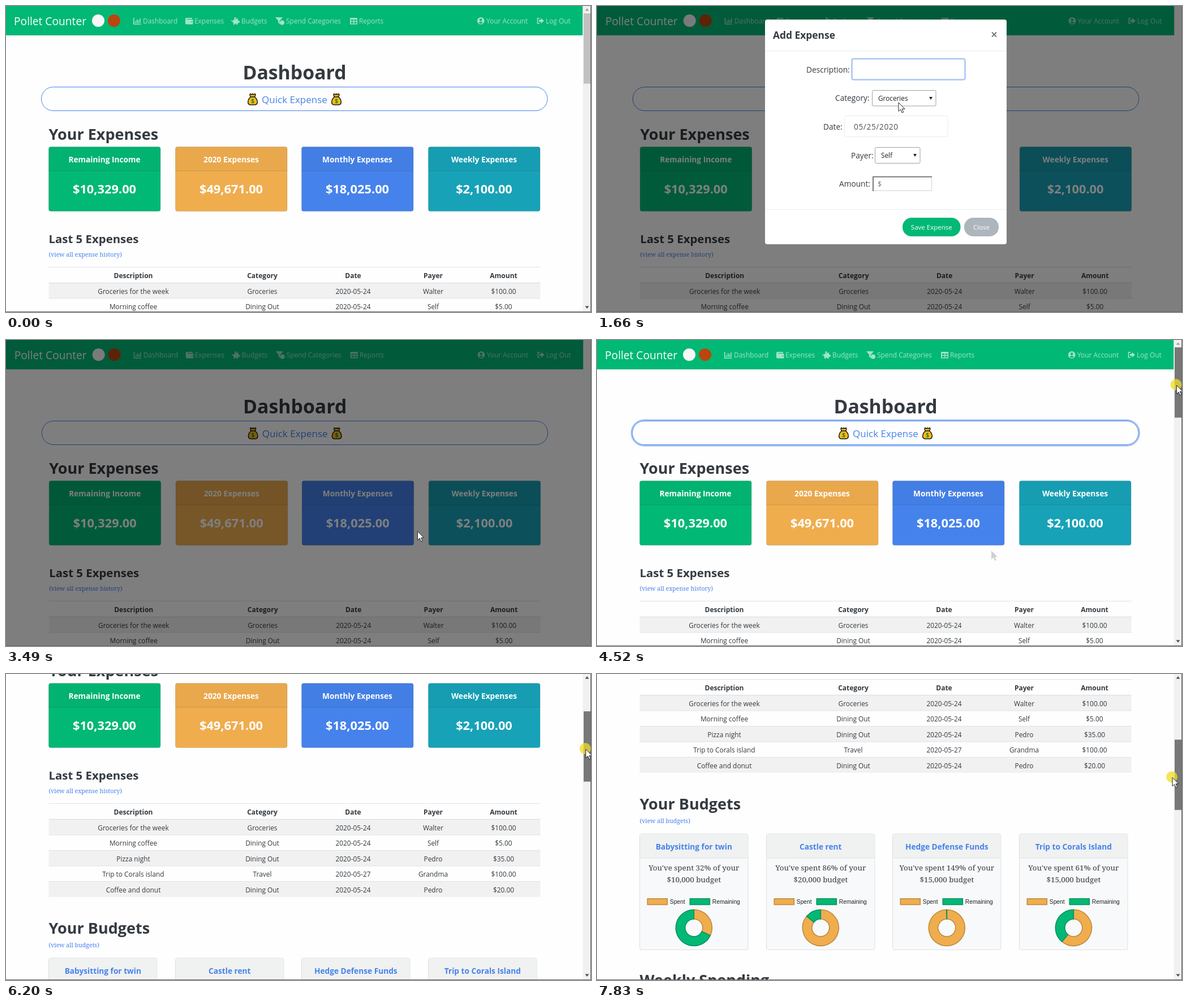
An HTML page that plays this animation: 1034x542 px, repeating every 7990 ms.

```html
<!DOCTYPE html>
<html lang="en">
<head>
<meta charset="utf-8">
<title>Expense dashboard</title>
<style>
  html, body { margin: 0; width: 100%; height: 100%; overflow: hidden; background: #fefefe; }
  svg { display: block; }
  text { font-family: "Open Sans", "Noto Sans", sans-serif; white-space: pre; }
  .serif { font-family: "Noto Serif", Georgia, serif; }
  .sans { font-family: "Liberation Sans", Arial, sans-serif; }
</style>
</head>
<body>
<svg id="stage" width="1034" height="542" viewBox="0 0 1034 542"></svg>
<script>
const GREEN = '#02b875', AMBER = '#f0ad4e', BLUE = '#4582ec', TEAL = '#17a2b8', INK = '#343a40';
const LOOP = 7990, STEP = 150;

const text = (x, y, str, size, { fill = INK, bold, mid, cls = '', more = '' } = {}) =>
  `<text x="${x}" y="${y}" font-size="${size}" fill="${fill}" class="${cls}" ${more}
    ${bold ? 'font-weight="700"' : ''} ${mid ? 'text-anchor="middle"' : ''}>${str}</text>`;
const rect = (x, y, w, h, fill, more = '') =>
  `<rect x="${x}" y="${y}" width="${w}" height="${h}" fill="${fill}" ${more}/>`;
const path = (d, more = '') => `<path d="${d}" ${more}/>`;
const line = (x1, y, x2, color, w = 1) => path(`M${x1} ${y}H${x2}`, `stroke="${color}" stroke-width="${w}"`);
const group = (x, y, body, more = '') => `<g transform="translate(${x} ${y})" ${more}>${body}</g>`;

// Navigation bar
const stroke = 'fill="none" stroke="#fff" stroke-width="1.6"';
const icons = {
  chart: path('M.8 1V12H13.5', stroke) + path('M4 10V7M6.7 10V3.5M9.3 10V5.5M12 10V2', stroke),
  wallet: path('M2 1H12V3H3V4H13.5V12.5H2Q0 12.5 0 10.5V3Q0 1 2 1ZM10.5 7.2V9H12V7.2Z', 'fill-rule="evenodd"'),
  piggy: path('M1 5Q2 7 3 6Q4 3.5 8 3.5L12 2V5L13.5 6.5H15V9.5H13L11.5 11V13H9V11.3H6.5V13H4V10.5Q2.5 9 2.7 7.5Q0 8 0 5Z')
    + '<circle cx="7" cy="1.8" r="1.8"/>',
  filter: path('M0 0H13L9 5Q6.5 7 8 10.5V12L5 9.5V6Z') + '<circle cx="12" cy="9.5" r="4"/>',
  table: path('M1 1H13V12.5H0V1ZM1.8 4V6.5H6V4ZM7.5 4V6.5H11.5V4ZM1.8 8.3V11H6V8.3ZM7.5 8.3V11H11.5V8.3Z', 'fill-rule="evenodd"'),
  user: path('M6.2 0A6.2 6.2 0 1 1 6.2 12.6A6.2 6.2 0 1 1 6.2 0ZM6.2 2.3A2.2 2.2 0 1 0 6.2 6.9A2.2 2.2 0 1 0 6.2 2.3ZM2.6 9.8Q6 12.8 9.8 9.8Q8.5 7.6 6.2 8Q3.7 7.6 2.6 9.8Z', 'fill-rule="evenodd"'),
  exit: path('M5 1.8H1.5V10.8H5', stroke) + path('M4 4.5H7.5V1.5L13 6.3L7.5 11V8H4Z'),
};
const links = [['chart', 225, 242, 'Dashboard'], ['wallet', 317, 333, 'Expenses'], ['piggy', 398, 416, 'Budgets'],
  ['filter', 476, 495, 'Spend Categories'], ['table', 608, 624, 'Reports'],
  ['user', 833, 849, 'Your Account'], ['exit', 938, 954, 'Log Out']];
const nav = rect(-1, 0, 1020.5, 52, GREEN) + text(14, 34, 'Pollet Counter', 19.2, { fill: '#fff' })
  + '<circle cx="163" cy="26" r="11" fill="#f7f7f7"/><circle cx="191" cy="26" r="11" fill="#b9460f"/>'
  + '<g fill="#fff" opacity=".62">'
  + links.map(([icon, x, tx, label]) => group(x, 20, icons[icon]) + text(tx, 31, label, 11.9, { fill: '#fff' })).join('') + '</g>';

// Quick expense button
const bag = x => group(x, 165,
  path('M-3.5 -4Q-6 -8.5 -4 -9.5L-1.5 -8L0 -9.5L1.5 -8L4 -9.5Q6 -8.5 3.5 -4Q8.3 0 8.3 5Q8.3 10 3.5 10H-3.5Q-8.3 10 -8.3 5Q-8.3 0 -3.5 -4Z',
    'fill="#f9b916" stroke="#1a1a1a" stroke-width="1.5"')
  + path('M-3.5 -4H3.5', 'stroke="#1a1a1a" stroke-width="1.5"')
  + text(0, 7, '$', 10, { fill: '#12823b', bold: true, mid: true }));
const pill = (grow, more) => rect(62.5 - grow, 143.5 - grow, 894.5 + 2 * grow, 42 + 2 * grow, 'none', `rx="${21 + grow}" ${more}`);
const quick = pill(1.7, 'id="ring" stroke="#4582ec" stroke-opacity=".5" stroke-width="2.4"')
  + pill(0, `id="pill" stroke="${BLUE}"`) + bag(436) + bag(584)
  + text(510, 171.5, 'Quick Expense', 17, { fill: BLUE, mid: true, more: 'id="quickText"' });

// Summary cards
const cardX = i => Math.round(75 + i * 223.6);
const totals = [['Remaining Income', '$10,329.00', GREEN], ['2020 Expenses', '$49,671.00', AMBER],
  ['Monthly Expenses', '$18,025.00', BLUE], ['Weekly Expenses', '$2,100.00', TEAL]];
const summary = totals.map(([name, sum, color], i) => group(cardX(i), 249,
  rect(.5, .5, 197.5, 114, color, 'rx="3.5" stroke="#000" stroke-opacity=".125"')
  + rect(0, 0, 198.5, 43, '#000', 'opacity=".03" rx="3.5"') + line(0, 43, 198.5, 'rgba(0,0,0,.125)')
  + text(99, 27.5, name, 13.7, { fill: '#fff', bold: true, mid: true })
  + text(99, 82.5, sum, 21.8, { fill: '#fff', bold: true, mid: true }))).join('');

// Expense table
const columns = [225, 453, 613.5, 755, 879.5];
const cells = (row, y, size, bold) => row.map((s, i) => text(columns[i], y, s, size, { mid: true, bold })).join('');
const expenses = [
  ['Groceries for the week', 'Groceries', '2020-05-24', 'Walter', '$100.00'],
  ['Morning coffee', 'Dining Out', '2020-05-24', 'Self', '$5.00'],
  ['Pizza night', 'Dining Out', '2020-05-24', 'Pedro', '$35.00'],
  ['Trip to Corals island', 'Travel', '2020-05-27', 'Grandma', '$100.00'],
  ['Coffee and donut', 'Dining Out', '2020-05-24', 'Pedro', '$20.00']];
const table = line(75.5, 462.5, 944.5, '#dee2e6') + cells(['Description', 'Category', 'Date', 'Payer', 'Amount'], 481.5, 12, true)
  + expenses.map((row, i) => {
    const y = 490.5 + i * 27.5;
    return (i % 2 ? '' : rect(75.5, y, 869, 27.5, '#f1f1f1'))
      + line(75.5, y, 944.5, '#dee2e6', i ? 1 : 1.6) + cells(row, y + 19, 11.9);
  }).join('');

// Budget cards
const sector = (from, to, fill, edge) => {
  const at = (r, turn) => `${r * Math.sin(turn * 2 * Math.PI)} ${-r * Math.cos(turn * 2 * Math.PI)}`;
  const big = +(to - from > .5);
  return path(`M${at(32, from)}A32 32 0 ${big} 1 ${at(32, to)}L${at(15.5, to)}A15.5 15.5 0 ${big} 0 ${at(15.5, from)}Z`,
    `fill="${fill}" stroke="${edge}" stroke-width="1.6"`);
};
const SPENT_EDGE = '#c08a3e', LEFT_EDGE = '#029360';
const key = (x, label, fill, edge) => rect(x, 115.5, 35, 10.5, fill, `stroke="${edge}" stroke-width="1.6"`)
  + text(x + 39.5, 124, label, 10.25, { cls: 'sans', fill: '#222' });
const budgets = [['Babysitting for twin', 32, 10], ['Castle rent', 86, 20],
  ['Hedge Defense Funds', 149, 15], ['Trip to Corals Island', 61, 15]];
const budgetCards = budgets.map(([name, spent, limit], i) => {
  const share = Math.min(spent / 100, .998);
  return group(cardX(i), 735.5,
    rect(.5, .5, 191.5, 205.5, '#f8f9fa', 'rx="3.5" stroke="#dcdfe1"') + rect(1, 1, 190.5, 42.5, '#f0f1f1')
    + line(0, 43.5, 192, '#dcdfe1')
    + text(96.3, 28, name, 13.7, { fill: BLUE, bold: true, mid: true })
    + text(96.3, 65, `You've spent ${spent}% of your`, 13.4, { cls: 'serif', mid: true })
    + text(96.3, 86.5, `$${limit},000 budget`, 13.4, { cls: 'serif', mid: true })
    + key(14.3, 'Spent', AMBER, SPENT_EDGE) + key(89.3, 'Remaining', GREEN, LEFT_EDGE)
    + group(96.3, 167, sector(0, share, AMBER, SPENT_EDGE) + sector(share, 1, GREEN, LEFT_EDGE)));
}).join('');

const heading = (y, str, size) => text(75.5, y, str, size, { bold: true });
const small = (y, str) => text(75.5, y, str, 10.6, { cls: 'serif', fill: BLUE });
const page = nav + text(510, 130, 'Dashboard', 33.8, { bold: true, mid: true }) + quick
  + heading(237, 'Your Expenses', 27) + summary
  + heading(420, 'Last 5 Expenses', 20.4) + small(444, '(view all expense history)') + table
  + heading(692.5, 'Your Budgets', 27) + small(717, '(view all budgets)') + budgetCards
  + heading(1005, 'Weekly Spending', 27);

// Add expense dialog
const label = (x, y, str) => text(x, y, str, 13.7);
const select = (x, y, w, h, value) => rect(x, y, w, h, '#fff', 'rx="2" stroke="#a0a0a0"')
  + text(x + 10.5, y + 18.5, value, 11.8, { fill: '#222' }) + path(`M${x + w - 12} ${y + 11.5}h6l-3 5z`, 'fill="#222"');
const button = (x, w, str, fill, id) => rect(x, 375, w, 33, fill, `rx="16" id="${id}"`)
  + text(x + w / 2, 396, str, 11.5, { fill: '#fff', mid: true });
const dialog = rect(297, 24, 427, 398, '#fff', 'rx="4"')
  + text(311, 58, 'Add Expense', 17.4, { bold: true })
  + path('M698 46.5l8 8m0 -8l-8 8', 'stroke="#777" stroke-width="2"')
  + line(297, 79.5, 724, '#e9ecef') + line(297, 360.5, 724, '#e9ecef')
  + label(370, 118, 'Description:')
  + rect(450.5, 93.5, 200, 37, '#fff', 'rx="3" id="field"') + path('M466.5 102V122', 'stroke="#222" id="caret"')
  + label(421, 168, 'Category:') + select(486.5, 149.5, 112.5, 27.5, 'Groceries')
  + label(400, 219, 'Date:') + rect(437.5, 194.5, 182.5, 37, '#fff', 'rx="3" stroke="#e9ecef"')
  + text(454, 218.5, '05/25/2020', 13.7, { fill: '#495057', more: 'letter-spacing=".6"' })
  + path('M574.5 211.5l4 -5l4 5zM574.5 215l4 5l4 -5zM589.5 209.5h10l-5 8z', 'fill="#444" id="spinner"')
  + label(449, 270, 'Payer:') + select(491.5, 250.5, 79.5, 28, 'Self')
  + label(428, 320, 'Amount:') + rect(488, 302, 104, 26, '#fff')
  + path('M487 327H591.5V302', 'fill="none" stroke="#e6e6e6" stroke-width="2"')
  + path('M488 328V302.5H592', 'fill="none" stroke="#7a7a7a" stroke-width="2"')
  + text(496, 320, '$', 12.5, { fill: '#777' })
  + button(540, 102.5, 'Save Expense', GREEN, 'save') + button(649, 61, 'Close', '#adb5bd', 'close');

const arrow = 'M0 0V15.5L3.7 12.2L6.2 18L8.7 17L6.2 11.3H11Z';
const hand = 'M-1 1Q0 -1 1.4 1V6.5L7 8Q8.3 8.4 8 10.5L7 15.5H0L-4 10.5Q-4.5 8.5 -2.8 9L-1 10.5Z';
const stage = document.getElementById('stage');
stage.innerHTML = `<g id="page">${page}</g>
  <g id="bar">${rect(1019.5, 0, 14.5, 542, '#f1f1f1')}${rect(1021, 13, 12, 124.5, '#c1c1c1', 'id="thumb"')}
    ${path('M1023.5 8.5h7l-3.5 -4.5z', 'id="up"')}${path('M1023.5 531.5h7l-3.5 4.5z', 'fill="#505050"')}</g>
  ${rect(0, 0, 1034, 542, '#000', 'id="shade"')}<g id="dialog">${dialog}</g>
  ${path('M1033.5 0V541.5H0', 'fill="none" stroke="#666"')}
  ${path(arrow, 'id="trail" fill="#d0d0d0" transform="translate(697 373)"')}
  <g id="cursor"><circle id="press" cx="-1" cy="-1" r="10" fill="#f0dc28" opacity=".75"/>
  ${path(arrow, 'id="arrow" fill="#fff" stroke="#222"')}${path(hand, 'id="hand" fill="#fff" stroke="#222"')}</g>`;
const el = {};
stage.querySelectorAll('[id]').forEach(e => el[e.id] = e);

const clamp = v => Math.max(0, Math.min(1, v));
const show = (e, on) => e.setAttribute('visibility', on ? 'visible' : 'hidden');
const set = (e, attrs) => { for (const k in attrs) e.setAttribute(k, attrs[k]); };
// Linear interpolation through [time, value] points
function track(points, t) {
  let i = 1;
  while (i < points.length - 1 && t > points[i][0]) i++;
  const [t0, a] = points[i - 1], [t1, b] = points[i];
  return a + (b - a) * clamp((t - t0) / (t1 - t0));
}
const scrollKeys = [[4500, 0], [5250, 100], [5400, 100], [5550, 129], [6900, 363], [7800, 453]];
const cursorX = [[150, 640], [600, 533], [2100, 533], [3000, 678], [3300, 678], [4350, 1024], [5550, 1027], [6900, 1022], [7800, 1017]];
const cursorY = [[150, 330], [600, 171], [2100, 171], [3000, 382], [3300, 382], [4350, 80]];

function draw(now) {
  const t = Math.floor(now % LOOP / STEP) * STEP;
  const within = (a, b) => t >= a && t < b;
  const scroll = track(scrollKeys, t), travel = scroll * .228;
  const dragging = t >= 4500;

  const hover = within(450, 750);
  set(el.pill, { fill: hover ? BLUE : 'none' });
  set(el.quickText, { fill: hover ? '#fff' : BLUE });
  show(el.ring, within(600, 1200) || t >= 3750);

  const closing = t >= 3300;
  const shade = closing ? 1 - clamp((t - 3550) / 150) : clamp((t - 675) / 150);
  const fade = closing ? 1 - clamp((t - 3250) / 150) : clamp((t - 820) / 150);
  const slide = Math.sin(clamp((t - (closing ? 3250 : 820)) / 300) * Math.PI / 2);
  const lift = 42 * (closing ? slide : 1 - slide);
  set(el.shade, { opacity: shade / 2 });
  set(el.dialog, { opacity: fade, transform: `translate(0 ${-lift})` });
  show(el.dialog, fade > 0);

  // Hiding the scrollbar nudges the page sideways
  show(el.bar, !shade);
  set(el.page, { transform: `translate(${shade ? .7 : 0} ${-scroll})` });
  set(el.thumb, { transform: `translate(0 ${travel})`, fill: dragging ? '#787878' : '#c1c1c1' });
  set(el.up, { fill: scroll ? '#505050' : '#a3a3a3' });

  const focused = within(1200, 3300);
  set(el.field, { stroke: focused ? '#a9c6f7' : '#e9ecef', 'stroke-width': focused ? 2.6 : 1 });
  show(el.caret, within(1200, 3150) && Math.floor((t - 1200) / 450) % 2 === 0);
  show(el.spinner, fade > 0 && !closing && lift > 15);
  const onClose = within(2850, 3450);
  set(el.close, { fill: onClose ? '#98a2ac' : '#adb5bd' });

  show(el.trail, within(4200, 4650));
  set(el.cursor, { transform: `translate(${track(cursorX, t)} ${track(cursorY, t) + travel})` });
  const visible = t >= 150, pointing = hover || onClose;
  show(el.press, within(600, 750) || within(3150, 3300) || dragging);
  show(el.arrow, visible && !pointing);
  show(el.hand, visible && pointing);
}

const start = performance.now();
(function frame() {
  draw(performance.now() - start);
  requestAnimationFrame(frame);
})();
</script>
</body>
</html>
```
